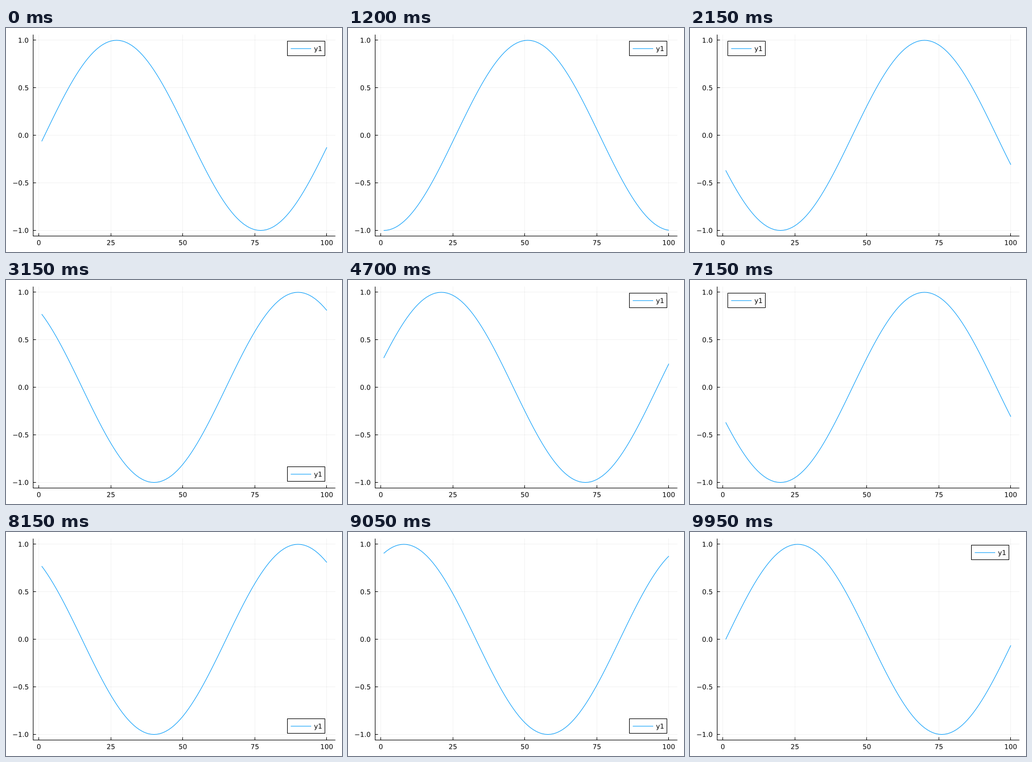
Recreate the animation shown at these times as a matplotlib script. Size 600 px wide and 400 px high, loop 10 s.

```python
import numpy as np
import matplotlib.pyplot as plt
from matplotlib.animation import FuncAnimation
from matplotlib.patches import PathPatch, Rectangle
from matplotlib.textpath import TextPath
from matplotlib.transforms import Affine2D

plt.rcParams.update({"font.family": "DejaVu Sans", "toolbar": "None"})

W, H, DPI = 600, 400, 100
PX = 72 / DPI                                   # one pixel in points
LEFT, RIGHT, TOP, BOTTOM = 48.5, 588.2, 11.8, 371.7
XLIM, YLIM = (-1.97, 102.97), (-1.06, 1.06)
BLUE = "#009afa"
FONT_SIZE = 12
FRAMES = 200
TICK = 5
BOX_W, BOX_H = 67, 26
GAP_X, GAP_Y = 18.6, 12                         # legend distance from the axes

x = np.arange(1, 101)


def unit(v, lim):
    return (v - lim[0]) / (lim[1] - lim[0])


def px(v):
    return LEFT + unit(v, XLIM) * (RIGHT - LEFT)


def py(v):
    return BOTTOM - unit(v, YLIM) * (BOTTOM - TOP)


def crisp(v):
    """Centre of the pixel that holds v."""
    return np.floor(v) + 0.5


def wave(i):
    return np.sin(2 * np.pi * (x - 2 - i) / 100)


def legend_corner(y):
    """Pick the corner (right, top) with the least curve in it."""
    u, v = unit(x, XLIM), unit(y, YLIM)
    corners = [(1, 1), (0, 1), (1, 0), (0, 0)]  # in order of preference

    def crowding(corner):
        du, dv = abs(u - corner[0]), abs(v - corner[1])
        near = (du <= 0.25) & (dv <= 0.25)
        return np.sum(near / (1 + 100 * np.hypot(du, dv)))

    return min(corners, key=crowding)


fig = plt.figure(figsize=(W / DPI, H / DPI), dpi=DPI, facecolor="white")
ax = fig.add_axes([0, 0, 1, 1])
ax.set_xlim(0, W)
ax.set_ylim(H, 0)
ax.axis("off")


def line(xs, ys, color="black", **kw):
    kw = {"lw": PX, "solid_capstyle": "butt", "snap": False, **kw}
    return ax.plot(xs, ys, color=color, **kw)[0]


def label(s, x0, baseline, align, base=ax.transData):
    """Outline text; align 0, 0.5 or 1 puts its left, centre or right at x0."""
    path = TextPath((0, 0), s, size=FONT_SIZE)
    ink = path.get_extents()
    place = Affine2D().translate(-ink.x0 - align * ink.width, 0)
    place.scale(1, -1).translate(x0, baseline)
    ax.add_patch(PathPatch(path, fc="black", lw=0, zorder=6, snap=False,
                           transform=place + base))


def draw_axes():
    left, bottom = crisp(LEFT), crisp(BOTTOM)
    for v in (0, 25, 50, 75, 100):
        tx = crisp(px(v))
        line([tx] * 2, [TOP, BOTTOM], alpha=0.05, zorder=1)
        line([tx] * 2, [bottom - TICK, bottom], zorder=2)
        label(str(v), px(v), 387.6, 0.5)
    for v in (-1, -0.5, 0, 0.5, 1):
        ty = crisp(py(v))
        line([LEFT, RIGHT], [ty] * 2, alpha=0.05, zorder=1)
        line([left, left + TICK], [ty] * 2, zorder=2)
        label(f"{v:.1f}".replace("-", "\u2212"), 39.7, py(v) + 4.3, 1)
    line([left - 0.5, RIGHT], [bottom] * 2, zorder=2)
    line([left] * 2, [TOP, bottom + 0.5], zorder=2)


def draw_legend(base):
    ax.add_patch(Rectangle((0.5, 0.5), BOX_W, BOX_H, fc="white", ec="black",
                           lw=PX, snap=False, zorder=4, transform=base))
    line([6.5, 43], [13.8, 13.8], BLUE, zorder=5, transform=base)
    label("y1", 48.3, 18.1, 0, base)


draw_axes()
curve = line([], [], BLUE, zorder=3, solid_joinstyle="round")
shift = Affine2D()
draw_legend(shift + ax.transData)


def update(i):
    y = wave(i)
    curve.set_data(px(x), py(y))
    right, top = legend_corner(y)
    bx = RIGHT - GAP_X - BOX_W if right else LEFT + GAP_X
    by = TOP + GAP_Y if top else BOTTOM - GAP_Y - BOX_H
    shift.clear().translate(np.floor(bx), np.floor(by))
    return curve,


anim = FuncAnimation(fig, update, frames=FRAMES, interval=50,
                     repeat=True, repeat_delay=0, blit=False)
plt.show()
```
